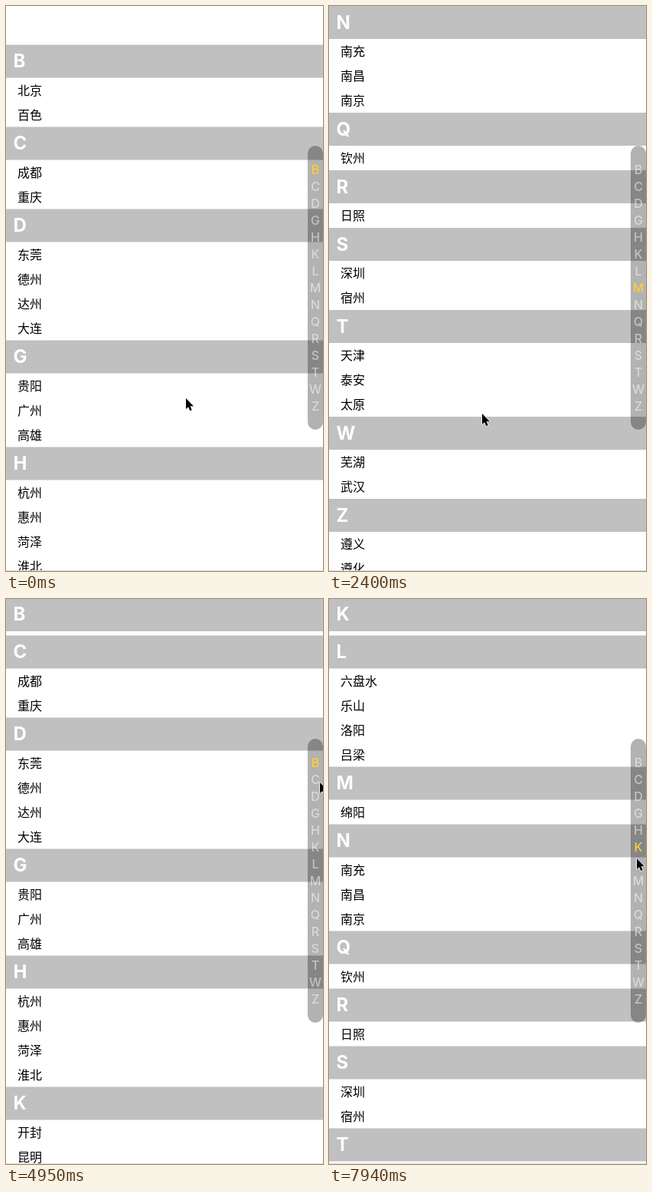
Recreate the animation shown at these times as an HTML page. Size 414x736 px, loop 8 s.

```html
<!DOCTYPE html>
<html lang="zh-CN">
<head>
<meta charset="utf-8">
<title>城市列表</title>
<style>
html, body { margin: 0; width: 100%; height: 100%; overflow: hidden; background: #fff; }
svg { display: block; width: 414px; height: 736px; }
.head { font: bold 24px Inter, "Liberation Sans", sans-serif; fill: #fff; }
.city { font: 16px "Noto Sans CJK SC", "Noto Sans CJK", sans-serif; fill: #000; }
.key { font: 500 16px Inter, "Liberation Sans", sans-serif; fill: #fff; fill-opacity: .5; text-anchor: middle; }
.key.on { fill: #ffcd32; fill-opacity: 1; }
</style>
</head>
<body>
<svg id="stage" viewBox="0 0 414 736"></svg>
<script>
const LOOP = 8000, STEP = 150, SHORT_STEP_END = 7490;
const HEAD = 43, ROW = 32, PINNED = 42, KEY_GAP = 22;
const DRAG_START = 3900, DRAG_INSET = 47.5;

const groups = [
  'B 北京 百色', 'C 成都 重庆', 'D 东莞 德州 达州 大连', 'G 贵阳 广州 高雄',
  'H 杭州 惠州 菏泽 淮北', 'K 开封 昆明', 'L 六盘水 乐山 洛阳 吕梁', 'M 绵阳',
  'N 南充 南昌 南京', 'Q 钦州', 'R 日照', 'S 深圳 宿州', 'T 天津 泰安 太原',
  'W 芜湖 武汉', 'Z 遵义 遵化'
].map(line => {
  const [letter, ...cities] = line.split(' ');
  return { letter, cities };
});

// Cursor tip and list scroll; swing is a detour on the way to the next pose.
const poses = [
  { t: 0, x: 235, y: 511, scroll: -50.5, swing: 0 },
  { t: 900, x: 241, y: 351, scroll: 617.5, swing: 0 },
  { t: 2400, x: 200, y: 531, scroll: 1048, swing: -40 },
  { t: DRAG_START, x: 402, y: 381, scroll: 1052, swing: 0 },
  { t: 4950, x: 410, y: 239, scroll: 70, swing: 300 },
  { t: 6150, x: 407, y: 269, scroll: 70, swing: 0 },
  { t: 7940, x: 402, y: 338, scroll: 770, swing: 0 }
];

function poseAt(t) {
  const i = poses.findIndex(pose => pose.t > t);
  if (i < 0) return poses[poses.length - 1];
  const a = poses[i - 1], b = poses[i];
  const p = (t - a.t) / (b.t - a.t), eased = p * p * (3 - 2 * p);
  const mix = name => a[name] + (b[name] - a[name]) * eased;
  const detour = a.swing * Math.sin(Math.PI * p);
  return { x: mix('x'), y: mix('y') + detour / 5, scroll: mix('scroll') + detour };
}

const stage = document.getElementById('stage');

function add(parent, tag, attrs, text) {
  const el = document.createElementNS('http://www.w3.org/2000/svg', tag);
  for (const name in attrs) el.setAttribute(name, attrs[name]);
  if (text) el.textContent = text;
  parent.appendChild(el);
  return el;
}

function move(el, x, y) {
  el.setAttribute('transform', `translate(${x} ${y})`);
}

function addBar(parent, y, height, baseline, letter) {
  add(parent, 'rect', { y, width: 414, height, fill: '#c0c0c0' });
  return add(parent, 'text', { class: 'head', x: 9.5, y: y + baseline }, letter);
}

const list = add(stage, 'g', {});
let y = 0;
for (const g of groups) {
  g.top = y;
  addBar(list, y, HEAD, 29.5, g.letter);
  y += HEAD;
  for (const city of g.cities) {
    add(list, 'text', { class: 'city', x: 15, y: y + 22 }, city);
    y += ROW;
  }
}

const pinned = add(stage, 'g', {});
const pinnedText = addBar(pinned, 0, PINNED, 27.5, 'B');

add(stage, 'rect', { x: 394, y: 182, width: 20, height: 370, rx: 10, fill: '#000', 'fill-opacity': .3 });
const keys = groups.map((g, i) =>
  add(stage, 'text', { class: 'key', x: 404, y: 219 + KEY_GAP * i }, g.letter));

add(stage, 'rect', { y: 735, width: 414, height: 1, fill: '#ddd' });

const cursor = add(stage, 'g', {});
const arrow = 'M0 0V14L3.1 11.2L5.3 16.2L7.7 15.2L5.6 10.3H10Z';
add(cursor, 'path', { d: arrow, fill: '#000', 'fill-opacity': .15, transform: 'translate(.5 1.5)' });
add(cursor, 'path', { d: arrow, stroke: '#fff', 'stroke-width': 1.6, 'stroke-linejoin': 'round', 'paint-order': 'stroke' });

// Dragging along the index makes the list jump from letter to letter.
function snap(scroll) {
  const reached = groups.filter(g => g.top <= scroll + DRAG_INSET);
  return Math.max(0, reached[reached.length - 1].top - DRAG_INSET);
}

function hold(t) {
  const start = t < SHORT_STEP_END ? 0 : SHORT_STEP_END;
  return start + Math.floor((t - start) / STEP) * STEP;
}

function render(time) {
  const t = hold(time % LOOP);
  const pose = poseAt(t);
  const scroll = t > DRAG_START ? snap(pose.scroll) : pose.scroll;
  const current = Math.max(0, groups.filter(g => g.top < scroll).length - 1);
  const next = groups[current + 1];

  move(list, 0, -scroll);
  pinned.setAttribute('visibility', scroll < 0 ? 'hidden' : 'visible');
  pinnedText.textContent = groups[current].letter;
  move(pinned, 0, next ? Math.min(0, next.top - scroll - PINNED) : 0);
  keys.forEach((key, i) => key.classList.toggle('on', i === current));
  move(cursor, pose.x, pose.y);
}

const begin = performance.now();
function tick() {
  render(performance.now() - begin);
  requestAnimationFrame(tick);
}
tick();
</script>
</body>
</html>
```
